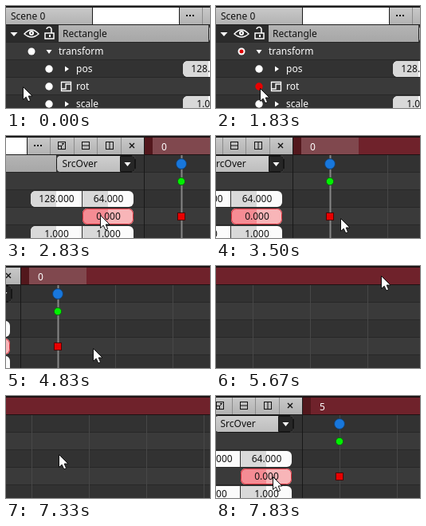
These frames come from a looping animation (256x128 px, 8000 ms). An HTML page with a canvas:

```html
<!DOCTYPE html>
<html>
<head>
<meta charset="utf-8">
<style>
html, body { margin: 0; width: 256px; height: 128px; overflow: hidden; background: #333; }
canvas { display: block; }
</style>
</head>
<body>
<canvas id="stage" width="256" height="128"></canvas>
<script>
const c = document.getElementById('stage').getContext('2d');
const FONT = '12px "Noto Sans", "Open Sans", sans-serif';
const LOOP = 8000, KEY_X = 411, FRAME_W = 72, PANEL_END = 365;

// Keyframes: [step, values...], six steps per second
const CAMERA = [[0, 0], [12, 0], [19, 268], [28, 268], [32, 581], [42, 581], [47, 256]];
const POINTER = [
  [0, 21, 101], [3, 21, 101], [7, 55, 103], [12, 55, 103], [15, 288, 101],
  [19, 329, 96], [21, 424, 103], [28, 424, 103], [29, 455, 103], [32, 700, 50],
  [33, 805, 20], [35, 771, 4], [36, 770, 31], [37, 770, 31], [40, 770, 36], [47, 327, 101]
];

function at(keys, n) {
  const i = keys.findIndex(k => k[0] >= n);
  if (i < 1) return keys[i ? keys.length - 1 : 0].slice(1);
  const a = keys[i - 1], b = keys[i], f = (n - a[0]) / (b[0] - a[0]);
  return a.slice(1).map((v, j) => v + (b[j + 1] - v) * f);
}

function rect(x, y, w, h, fill) {
  c.fillStyle = fill;
  c.fillRect(x, y, w, h);
}

function gradient(x0, y0, x1, y1, ...colors) {
  const g = c.createLinearGradient(x0, y0, x1, y1);
  colors.forEach((col, i) => g.addColorStop(i / (colors.length - 1), col));
  return g;
}

function text(s, x, y, fill = '#fff', align = 'left') {
  c.font = FONT;
  c.textAlign = align;
  c.fillStyle = fill;
  c.fillText(s, x, y);
}

function paint(fill, stroke) {
  if (fill) { c.fillStyle = fill; c.fill(); }
  if (stroke) { c.strokeStyle = stroke; c.lineWidth = 1; c.stroke(); }
}

function dot(x, y, r, fill, stroke) {
  c.beginPath();
  c.arc(x, y, r, 0, 7);
  paint(fill, stroke);
}

function shape(d, fill, stroke, width, x = 0, y = 0) {
  const p = new Path2D(d);
  c.save();
  c.translate(x, y);
  if (fill) { c.fillStyle = fill; c.fill(p); }
  if (stroke) { c.strokeStyle = stroke; c.lineWidth = width; c.stroke(p); }
  c.restore();
}

function box(x, y, w, h, r, fill, stroke) {
  const inset = stroke ? .5 : 0;
  c.beginPath();
  c.roundRect(x + inset, y + inset, w - 2 * inset, h - 2 * inset, r);
  paint(fill, stroke);
}

const down = (x, y, r, fill = '#fff') => shape(`M${-r} -2H${r}L0 3Z`, fill, null, 0, x, y);
const right = (x, y) => shape('M-2 -3.5V3.5L3 0Z', '#fff', null, 0, x, y);

// A value slider filled to its middle
function field(x, y, value, radii, [filled, empty], stroke) {
  box(x, y, 64, 20, radii, empty, null);
  c.save();
  c.clip();
  rect(x, y, 32, 20, filled);
  c.restore();
  if (stroke) box(x, y, 64, 20, radii, null, stroke);
  text(value, x + 32.5, y + 14, '#111', 'center');
}

function fieldPair(y, a, b) {
  const colors = ['#d9d9d9', '#fbfbfb'];
  field(222, y, a, [6, 0, 0, 6], colors);
  field(287, y, b, [0, 6, 6, 0], colors);
}

function rows() {
  for (let i = 0; i < 5; i++) {
    const y = 24 + i * 22;
    rect(0, y, 1200, 22, i % 2 ? '#3a3a3a' : '#323232');
    rect(0, y + 21, 1200, 1, '#272727');
  }
}

function titleBar() {
  const gray = gradient(0, 1, 0, 23, '#cacaca', '#b2b2b2');
  rect(0, 0, PANEL_END, 24, '#1c1c1c');
  rect(0, 2, 108, 21, gray);
  rect(109, 2, 108, 21, '#fff');
  rect(218, 2, 146, 21, gray);
  text('Scene 0', 6, 17, '#111');
  for (const x of [246, 276, 305, 335]) rect(x, 2, 1, 21, '#8c8c8c');
  for (const x of [227, 231, 235]) rect(x - 1, 11, 2, 2, '#111');
  c.strokeStyle = '#111';
  c.lineWidth = 1;
  for (const x of [261, 291, 321]) c.strokeRect(x - 4.5, 7.5, 9, 9);
  shape('M257 12.5H260.5V16M260 13L264 9M261 9.5H264M286.5 12H295.5M321 7.5V16.5', null, '#111', 1);
  shape('M346 9L352 15M352 9L346 15', null, '#111', 1.4);
}

function tree(keyed) {
  rect(0, 24, 66, 21, '#2b2b2b');
  rect(66, 24, 188, 21, gradient(0, 24, 0, 46, '#b4b4b4', '#a6a6a6'));
  rect(PANEL_END - 1, 24, 1, 104, '#181818');
  text('Rectangle', 71, 39, '#111');
  down(10, 35, 4.5);

  shape('M23 35Q32 25 41 35Q32 43 23 35Z', null, '#fff', 1.4);
  dot(32, 34, 3, '#fff');
  dot(32, 34, 1, '#2b2b2b');
  shape('M49 34H60V41H49ZM57 34V30A3 3 0 0 0 51 29', null, '#fff', 1.5);
  rect(54, 36, 2, 3, '#fff');

  box(254, 24, 100, 22, 4, gradient(0, 25, 0, 45, '#cfcfcf', '#bdbdbd'), '#161616');
  box(334, 25, 19, 20, [0, 3, 3, 0], '#262626', '#161616');
  text('SrcOver', 261.5, 39, '#111');
  down(343.5, 35, 4);

  dot(32, 57, 4.5, '#fff');
  if (keyed) dot(32, 57, 2.5, '#e00000');
  down(54, 57, 3.5);
  text('transform', 66, 61);

  [['pos', 79], ['rot', 101], ['scale', 123]].forEach(([name, y]) => {
    const isRot = name === 'rot';
    text(name, 88, y + 4);
    dot(54, y, 4.7, isRot && keyed ? '#e80000' : '#fff');
    if (!isRot) right(76, y);
  });
  shape('M69.5 95.5H81.5V106.5H69.5ZM70 104H75V98H81', null, '#fff', 1.3);

  fieldPair(69, '128.000', '64.000');
  field(287, 91, '0.000', 6, ['#f58c94', '#f8b5b8'], '#d8303c');
  fieldPair(113, '1.000', '1.000');
}

function timeline(frame) {
  const playX = KEY_X + frame * FRAME_W;
  rect(PANEL_END, 0, 900, 24, '#1d1112');
  rect(PANEL_END, 2, 10, 21, '#52171c');
  rect(375, 2, 900, 21, '#6f222b');
  rect(playX - 36, 2, FRAME_W, 21, '#80484e');
  for (let i = 0; i < 11; i++) rect(KEY_X + i * FRAME_W, 24, 1, 104, '#474747');
  rect(playX - .5, 24, 2, 104, '#868686');
  text(frame, 389.5, 18, '#fff', 'center');
  if (frame) {
    text(frame, playX, 18, '#fff', 'center');
    rect(playX, 20, 1, 4, '#fff');
  }
  dot(KEY_X, 35, 6.5, '#1877dc', '#123f70');
  dot(KEY_X, 57, 4.7, '#00f000', '#145c14');
  rect(KEY_X - 5, 96, 10, 10, '#500');
  rect(KEY_X - 4, 97, 8, 8, '#e80000');
}

function draw(n) {
  const cam = Math.round(at(CAMERA, n)[0]);
  const [px, py] = at(POINTER, n).map(Math.round);
  c.setTransform(1, 0, 0, 1, -cam, 0);
  rows();
  timeline(n >= 35 ? 5 : 0);
  titleBar();
  tree(n >= 11);
  shape('M.5 .5V16.5L4.2 13.2L6.8 18.8L9.6 17.6L7.2 12H12Z', '#fff', '#111', 1, px, py);
}

function tick() {
  const t = performance.now() % LOOP;
  // The small lead keeps rounded step times on the right side
  draw(Math.min(47, Math.floor((t + 4) * 6 / 1000)));
  requestAnimationFrame(tick);
}
tick();
</script>
</body>
</html>
```
